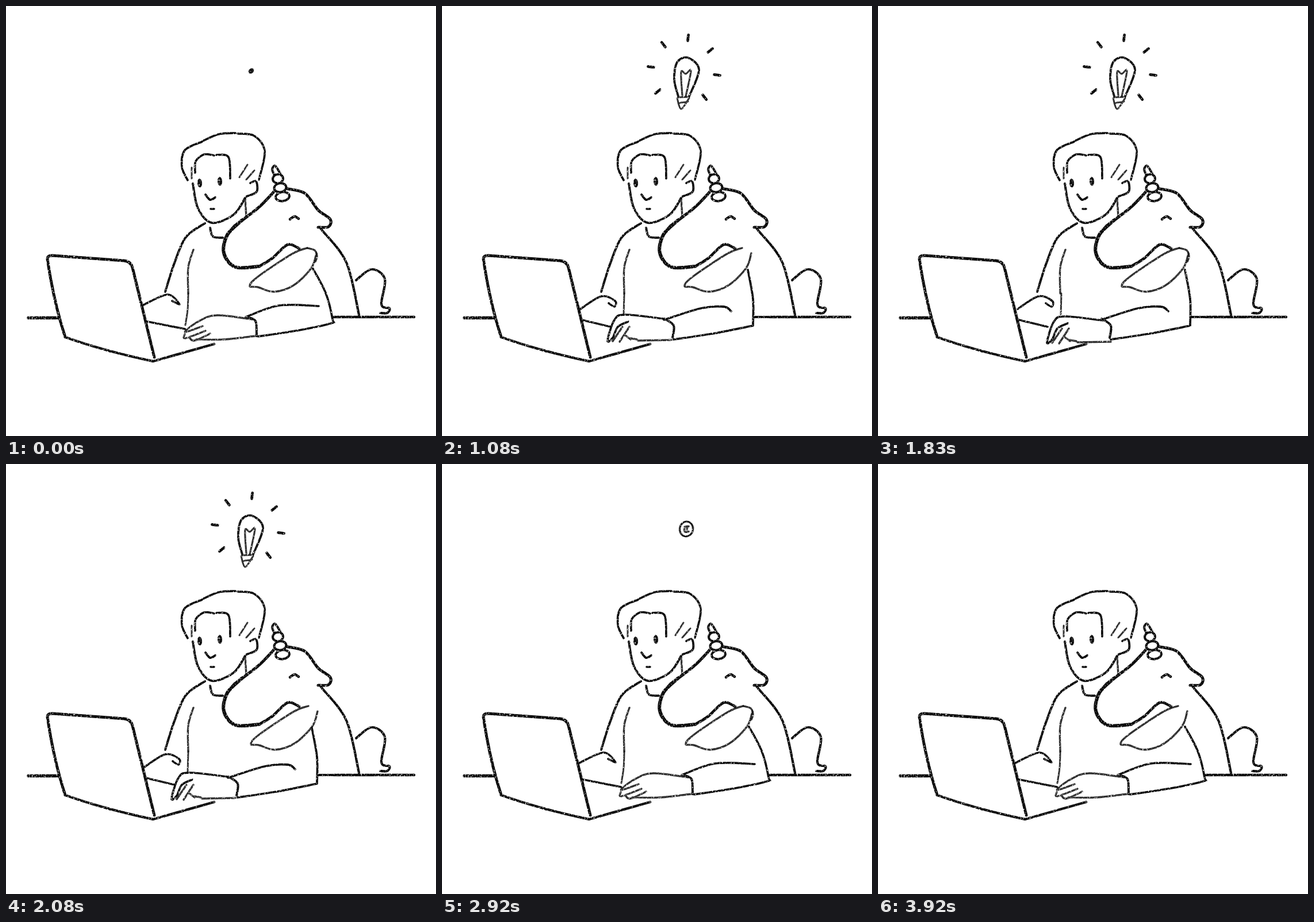
An HTML page for the animation above (4000 ms loop, 748 px wide and 748 px high).

```html
<!DOCTYPE html>
<html lang="en">
<head>
<meta charset="utf-8">
<title>A bright idea</title>
<style>
  html, body { margin: 0; width: 100%; height: 100%; overflow: hidden; background: #fff; }
  svg { display: block; width: 100vw; height: 100vh; }
  path, .ring { fill: none; stroke: #0c0c0c; stroke-linecap: round; stroke-linejoin: round; }
</style>
</head>
<body>
<svg viewBox="0 0 748 748">
  <defs>
    <filter id="pencil" filterUnits="userSpaceOnUse" x="0" y="0" width="748" height="748" color-interpolation-filters="sRGB">
      <feTurbulence type="fractalNoise" baseFrequency=".25" numOctaves="2" seed="4"/>
      <feColorMatrix values="1 0 0 0 0  0 1 0 0 0  0 0 1 0 0  0 0 0 0 1" result="noise"/>
      <feDisplacementMap in="SourceGraphic" in2="noise" scale="1.4" xChannelSelector="R" yChannelSelector="G" result="rough"/>
      <feTurbulence type="fractalNoise" baseFrequency=".4" numOctaves="2" seed="9"/>
      <feColorMatrix values="0 0 0 0 0  0 0 0 0 0  0 0 0 0 0  -5 0 0 0 3.9" result="grain"/>
      <feComposite in="rough" in2="grain" operator="in"/>
    </filter>
  </defs>
  <g id="ink" filter="url(#pencil)"></g>
</svg>
<script>
const LOOP = 4000, FPS = 12;
const ink = document.getElementById('ink');

function add(parent, tag, attrs = {}) {
  const el = document.createElementNS('http://www.w3.org/2000/svg', tag);
  for (const key in attrs) el.setAttribute(key, attrs[key]);
  return parent.appendChild(el);
}
const group = (parent = ink) => add(parent, 'g');
const show = (el, on) => { el.style.display = on ? '' : 'none'; };
const move = (el, value) => el.setAttribute('transform', value);

// Smooth curve through a few "x y" key points
function curve(text) {
  const p = text.match(/\S+ \S+/g).map(pair => pair.split(' ').map(Number));
  return p.slice(1).reduce((d, c, i) => {
    const b = p[i], a = p[i - 1] || b, e = p[i + 2] || c;
    const out = b.map((v, j) => v + (c[j] - a[j]) / 6);
    const into = c.map((v, j) => v - (e[j] - b[j]) / 6);
    return `${d}C${out} ${into} ${c}`;
  }, 'M' + p[0]);
}

const stroke = (parent, width, d) => add(parent, 'path', {
  d, 'stroke-width': width, 'stroke-opacity': width < 3.6 ? .85 : 1
});
// Several curves, separated by "/"
const draw = (parent, width, text) => stroke(parent, width, text.split('/').map(curve).join(''));

const oval = (parent, cx, cy, rx, ry, turn, attrs) => add(parent, 'ellipse', {
  cx, cy, rx, ry, fill: '#0c0c0c', transform: `rotate(${turn} ${cx} ${cy})`, ...attrs
});

// Desk and laptop
stroke(ink, 5.5, 'M39 542.5H92');
stroke(ink, 4.4, 'M570 541H710');
stroke(ink, 5, 'M103 576Q83 515 72 440Q72 434 80 434L205 443Q217 444 220 455L258 611');
stroke(ink, 4.4, 'M103 576Q170 600 256 618L362 588');

// Torso
draw(ink, 4, '346 378 313 402 293 447 277 497 / 355 386 360 401 377 403');
draw(ink, 3.4, '326 424 317 455 317 500 / 416 334 418 367');

// Head
const head = group();
draw(head, 3.7, '341 236 311 251 306 280 316 303 / 344 234 370 223 399 221 / 403 222 432 226 450 253 440 302');
draw(head, 3.7, '329 290 330 270 345 258 362 260 / 366 259 387 263 390 300');
draw(head, 3, '323 281 323 300 / 420 276 406 298 / 432 286 418 302');
draw(head, 4, '325 309 334 352 358 377 396 363 417 332');
draw(head, 3.8, '425 308 435 305 436 323 419 331');

draw(ink, 4, '347 328 355 337 364 333');
const mouth = draw(ink, 3.6, '356 353 362 353');
const openEyes = group(), shutEyes = group();
for (const side of [-1, 1]) {
  oval(openEyes, 354.5 + 17.5 * side, 306.5 - 1.5 * side, 4, 7.8, -4);
  oval(shutEyes, 353 + 17.5 * side, 310 - 3 * side, 4, 2.8, 0);
}

// Unicorn
draw(ink, 5, '490 318 520 326 543 355 564 371 561 384 543 385 / 467 322 440 350 397 383');
draw(ink, 6, '410 373 385 398 379 430 399 454 440 453');
draw(ink, 4.8, '440 453 463 439 490 415 510 422');
draw(ink, 4.5, '494 371 502 366 509 370');
draw(ink, 4.2, '548 388 592 446 614 537 / 609 477 636 458 659 475 653 519 667 526 663 534 651 534');
draw(ink, 4, '466 292 463 284 468 278 477 291');
for (let i = 0; i < 3; i++) {
  oval(ink, 473 + 4 * i, 300.5 + 15.5 * i, 9 + 1.5 * i, 7.8, -8, { class: 'ring', fill: 'none', 'stroke-width': 4 });
}

// Floppy ear; the cap closes it while at rest
const ear = group();
draw(ear, 3.4, '540 430 531 456 500 486 466 497 438 489 424 487 438 471 498 431 524 421');
const earCap = draw(ear, 3.4, '524 421 537 425 541 435 538 445');

// Resting arm
const wide = group();
draw(wide, 3.7, '534 457 556 499 568 545 565 552 510 564 438 575 / 417 541 475 521 544 522');
draw(wide, 4, '419 541 434 548 436 574');
draw(wide, 3.4, '428 545 367 538 336 548 311 567 342 557 / 311 571 312 578 347 565 / 320 578 328 582 355 570 / 331 580 380 580 434 574');
draw(wide, 3.6, '239 520 281 502 302 519 289 513 / 246 549 312 562');
draw(wide, 3, '317 500 316 528 312 555');

// Typing arm
const tucked = group();
draw(tucked, 3.8, '532 459 541 510 541 555 / 541 556 470 570 403 580 / 386 546 450 526 490 523 503 531');
draw(tucked, 4, '387 544 403 556 401 577');
draw(tucked, 3.6, '241 527 277 505 301 513 300 523 290 517 / 243 546 293 558');
draw(tucked, 3, '317 500 316 537');
draw(tucked, 4.2, '542 541 570 541');
const hand = group(tucked);
draw(hand, 3.7, '385 544 319 537 300 546 288 582 297 577 306 558 324 549');
draw(hand, 3.4, '297 583 314 558 / 309 584 326 558 / 319 573 328 580 / 328 578 339 580 / 341 582 399 581');

// Light bulb and its small first and last stages
const idea = group();
const bulb = group(idea), base = group(idea), stub = group(idea), bud = group(idea);
draw(bulb, 3.8, '411 157 404 128 409 98 428 90 447 111 430 157');
draw(bulb, 3.2, '418 156 416 115 424 118 433 113 424 157');
draw(base, 3, '410 159 430 158 / 409 160 416 179 430 160 / 411 169 428 166');
draw(stub, 3.2, '411 158 407 177 / 430 157 420 178');
oval(bud, 425, 113, 23, 26, 10, { class: 'ring', fill: 'none', 'stroke-width': 3 });
draw(bud, 3.4, '433 104 419 106 420 123 433 122 / 428 107 427 115');
for (const el of idea.querySelectorAll('path, .ring')) el.setAttribute('vector-effect', 'non-scaling-stroke');
const dot = oval(ink, 426.5, 113, 5.2, 4, -45);

// Rays fan around the bulb, open at the bottom
const rays = group(), longRays = group(rays), shortRays = group(rays);
for (let i = 0; i < 7; i++) {
  const turn = `rotate(${142 + 45 * i} 421 113)`;
  move(stroke(longRays, 4.8, 'M474 113h10'), turn);
  move(stroke(shortRays, 4.4, 'M474 113h5'), turn);
}

function poseEar(k) {
  const beat = k % 8, rest = beat % 3 === 0;
  const sway = rest ? 0 : (beat < 4 ? 2 : -2) * (k % 2 ? 1 : 1.5);
  move(ear, `translate(${sway} 0)`);
  show(earCap, rest);
}

function poseArm(k) {
  const beat = k >= 12 && k < 35 ? k % 4 : 0;
  const typing = beat === 1 || beat === 2;
  show(wide, !typing);
  show(tucked, typing);
  move(wide, beat === 3 ? 'translate(6 8)' : '');
  move(tucked, beat === 2 ? 'translate(2 0)' : '');
  move(hand, beat === 2 ? 'translate(4 3)' : '');
}

function poseHead(blink) {
  move(head, blink ? 'translate(-3 3) rotate(-1.5 360 378)' : '');
  move(mouth, blink ? 'translate(-1 2)' : '');
  show(openEyes, !blink);
  show(shutEyes, blink);
}

function poseBulb(k) {
  const size = Math.max(0, Math.min((k + .4) / 5, (41 - k) / 12, 1));
  const tiny = size < .1, small = size <= .5, lit = k >= 5 && k < 29;
  move(idea, `translate(425 113) scale(${size}) translate(-425 -113)`);
  show(idea, !tiny);
  show(dot, tiny && size > 0);
  show(bud, small);
  show(bulb, !small);
  show(base, lit);
  show(stub, !small && !lit);

  const long = k % 4 === 1 || k % 4 === 2;
  show(rays, k >= 8 && k < 29);
  show(longRays, long);
  show(shortRays, !long);
}

// Steps start on the nearest 10 ms
function stepAt(t) {
  const k = Math.floor((t + 5) * FPS / 1000);
  return Math.round(k * 100 / FPS) * 10 > t ? k - 1 : k;
}

let last = -1;
const began = performance.now();
function tick() {
  const k = stepAt((performance.now() - began) % LOOP);
  if (k !== last) {
    last = k;
    poseEar(k);
    poseArm(k);
    poseHead(k >= 8 && k < 12);
    poseBulb(k);
  }
  requestAnimationFrame(tick);
}
tick();
</script>
</body>
</html>
```
